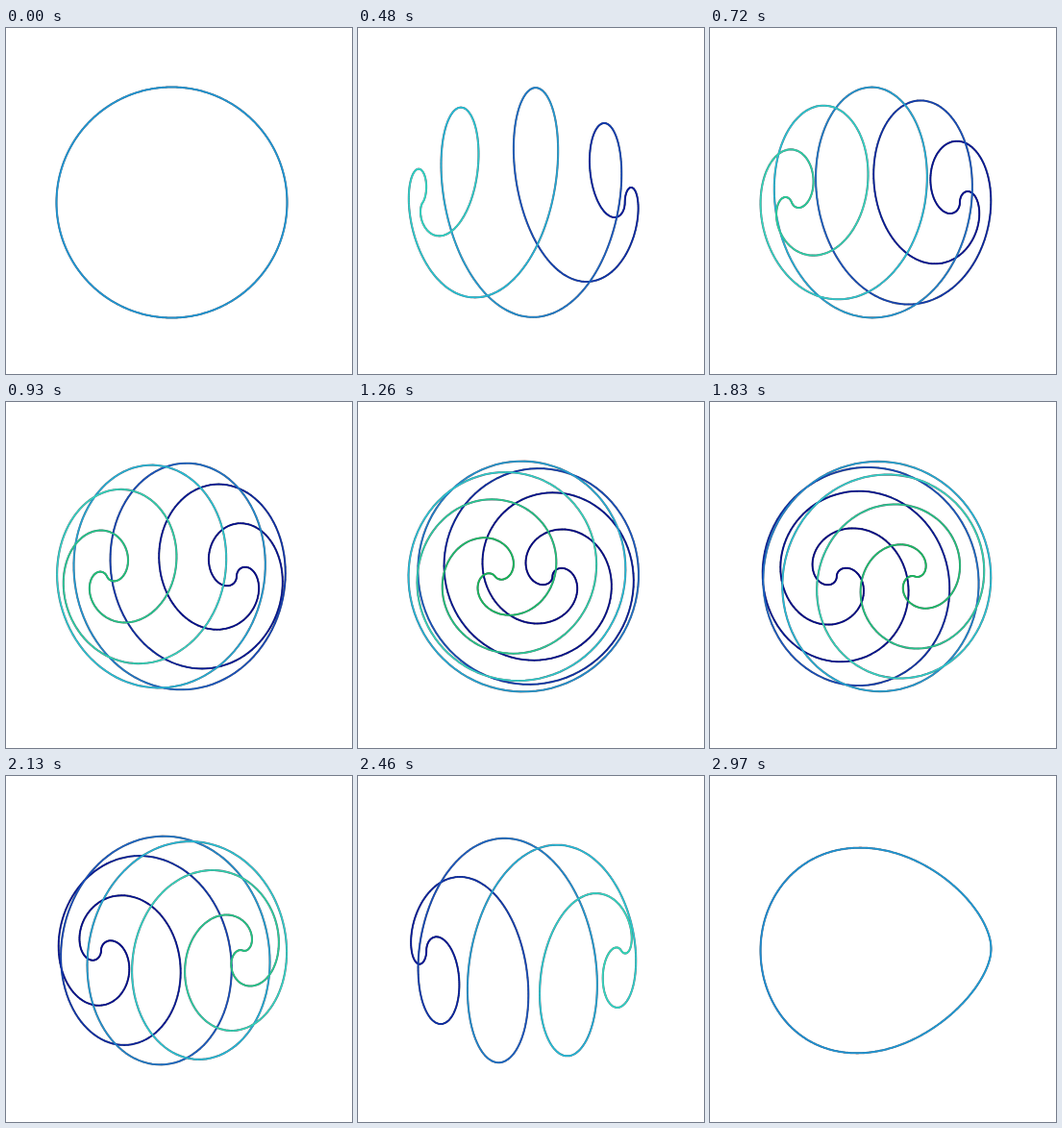
Recreate the animation shown at these times as an HTML page with a canvas. Size 360 px wide and 360 px high, loop 3 s.

```html
<!DOCTYPE html>
<html lang="en">
<head>
<meta charset="utf-8">
<title>Twisting ring</title>
<style>
html, body { margin: 0; width: 100%; height: 100%; overflow: hidden; background: #fff; }
canvas { display: block; width: 360px; height: 360px; }
</style>
</head>
<body>
<canvas id="stage" width="360" height="360"></canvas>
<script>
const ctx = document.getElementById('stage').getContext('2d');
const LOOP = 3000, STEP = 30;
const CX = 172.5, CY = 181.5, R = 120, N = 720;

// Colour stops: [value, r, g, b], from far to near
const STOPS = [
  [-1, 0, 0, 128], [-0.5, 4, 24, 150], [-0.2, 24, 84, 190], [0, 32, 148, 208],
  [0.25, 36, 190, 215], [0.5, 52, 214, 190], [1, 20, 180, 80]
];

function shade(v) {
  let i = 1;
  while (i < STOPS.length - 1 && v > STOPS[i][0]) i++;
  const a = STOPS[i - 1], b = STOPS[i];
  const f = (v - a[0]) / (b[0] - a[0]);
  const mix = k => Math.round(a[k] + (b[k] - a[k]) * f);
  return `rgb(${mix(1)},${mix(2)},${mix(3)})`;
}

// A great circle, twisted about its axis and then turned around the vertical
function point(s, twist, turn) {
  const axis = Math.cos(s), rad = Math.sin(s);
  const psi = twist * Math.abs(s);
  return {
    x: CX + R * (axis * Math.cos(turn) + rad * Math.sin(psi) * Math.sin(turn)),
    y: CY - R * rad * Math.cos(psi),
    v: -axis * Math.sin(turn)
  };
}

function draw(u) {
  const twist = 32 * u * (1 - u), turn = Math.PI * u;
  const pts = [];
  for (let i = 0; i <= N; i++) {
    pts.push(point(-Math.PI + 2 * Math.PI * i / N, twist, turn));
  }

  ctx.fillStyle = '#fff';
  ctx.fillRect(0, 0, 360, 360);
  ctx.lineJoin = ctx.lineCap = 'round';

  ctx.beginPath();
  pts.forEach(p => ctx.lineTo(p.x, p.y));
  ctx.closePath();
  ctx.lineWidth = 2.1;
  ctx.strokeStyle = 'rgba(0,10,30,0.6)';
  ctx.stroke();

  const parts = [];
  for (let i = 0; i < N; i++) {
    parts.push({ a: pts[i], b: pts[i + 1], v: (pts[i].v + pts[i + 1].v) / 2 });
  }
  parts.sort((p, q) => p.v - q.v);
  ctx.lineWidth = 1.5;
  for (const { a, b, v } of parts) {
    ctx.strokeStyle = shade(v);
    ctx.beginPath();
    ctx.moveTo(a.x, a.y);
    ctx.lineTo(b.x, b.y);
    ctx.stroke();
  }
}

const start = performance.now();
let last = 0;
function tick() {
  const t = (performance.now() - start) % LOOP;
  const n = Math.floor(t / STEP);
  if (n !== last) {
    draw(n * STEP / LOOP);
    last = n;
  }
  requestAnimationFrame(tick);
}
draw(0);
requestAnimationFrame(tick);
</script>
</body>
</html>
```
